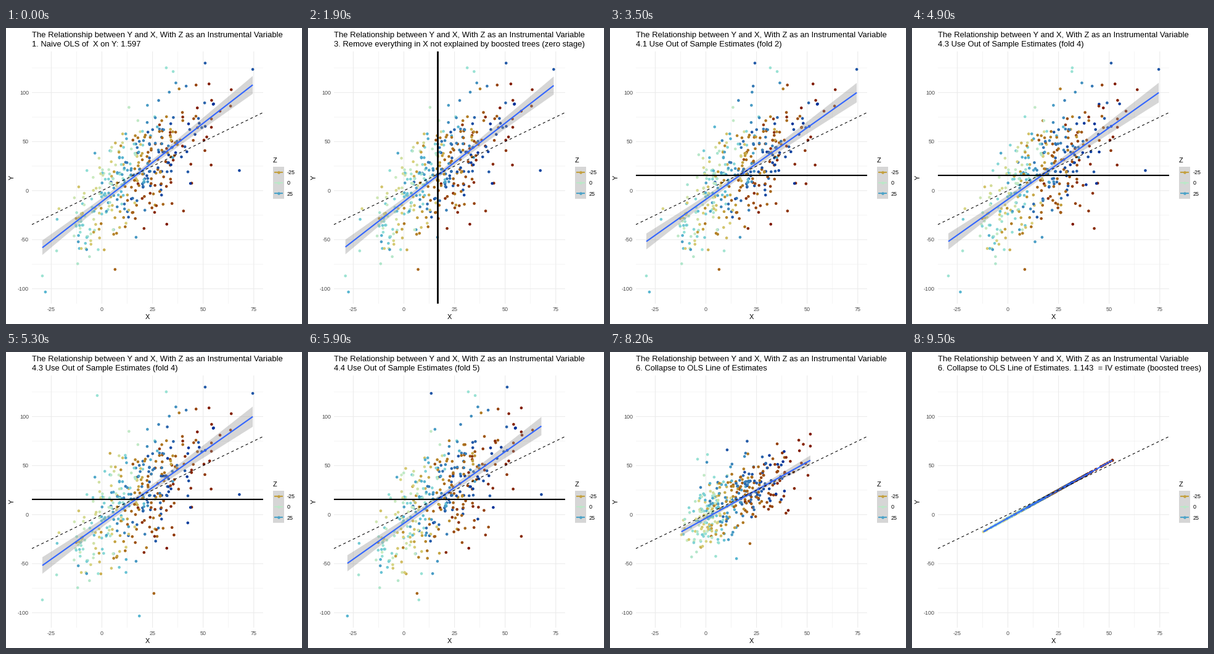
A matplotlib script for the animation above (10 s loop, 480 by 480 pixels).

```python
import numpy as np
import matplotlib.pyplot as plt
from matplotlib.animation import FuncAnimation
from matplotlib.colors import LinearSegmentedColormap, Normalize
from matplotlib.patches import Rectangle

SIZE, FRAMES, STEP = 480, 100, 100
plt.rcParams["font.family"] = "Liberation Sans"
BLUE, GRID, KEY = "#3366FF", "#EBEBEB", "#D6D6D6"
MEAN_X, MEAN_Y = 16.7, 15.5
OLS, IV = 1.597, 1.143

ROMA = LinearSegmentedColormap.from_list("roma", [
    "#7E1700", "#96440C", "#AB6E1B", "#C19B38", "#D9D27C", "#CBEBC2",
    "#95E1D6", "#5BBAD3", "#408EBE", "#2962AB", "#033198"])
Z_NORM = Normalize(-60, 53)

# The extremes of the cloud: x, y, z, prediction, fold
EXTREMES = [(-27.9, -103.3, 20, 18.5, 4), (-29.4, -86.9, 6, 7.4, 5),
            (74.5, 123.6, 44, 13.5, 5), (51, 130, 43, 24.2, 2),
            (31.8, 125.2, 7, 3, 1), (35.2, 121.4, 7, -2.3, 4),
            (67.9, 20.5, 48, 36, 2), (6.5, -80.3, -40, 25.7, 4)]


def signal(z):
    """Part of x that the instrument drives."""
    return 1 + 0.0147 * z**2


def make_data(n=390, seed=7):
    """A shared shock confounds x and y; predictions of x are noisy."""
    rng = np.random.default_rng(seed)
    m = 4 * n
    z = rng.uniform(-60, 53, m)
    shock, noise = rng.normal(0, 11, m), rng.normal(0, 25, m)
    x = signal(z) + shock
    y = x + 1.5 * shock + noise
    slope, base = np.polyfit(x, y, 1)
    y += (OLS - slope) * x + MEAN_Y - OLS * MEAN_X - base
    pred = np.clip(signal(z) + rng.normal(0, 6, m), -14, 58)
    fold = rng.integers(1, 6, m)
    keep = ((x > -24) & (x < 65) & (y > -76) & (y < 113)
            & (abs(y - MEAN_Y - OLS * (x - MEAN_X)) < 75))
    cloud = np.column_stack([x, y, z, pred, fold])[keep][:n]
    return np.vstack([cloud, EXTREMES]).T


X, Y, Z, PRED, FOLD = make_data()
FITTED = X - 5.5 * np.tanh((X - signal(Z)) / 8)
LINEAR = np.interp(PRED, [PRED.min(), PRED.max()], [-12.1, 51.6])


def on_line(x, slope):
    return MEAN_Y + slope * (x - MEAN_X)


class State:
    """Points, their fit line and its 95 % band, shown from a start time on."""

    def __init__(self, start, steps, title, x, y, slope, mean=""):
        self.start, self.steps, self.title = start, steps, title
        self.points, self.mean = np.array([x, y]), mean
        u = np.linspace(x.min(), x.max(), 80)
        error = np.std(y - on_line(x, slope)) / np.sqrt(len(x))
        half = 1.97 * error * np.hypot(1, (u - MEAN_X) / x.std())
        self.fit = np.array([u, on_line(u, slope), half])


def fold_state(k, start, steps):
    tag = "4." if k == 1 else f"4.{k - 1}"
    return State(start, steps, f"{tag} Use Out of Sample Estimates (fold {k})",
                 np.where(FOLD == k, PRED, X), Y, 1.46, "y")


TREES = "explained by boosted trees (zero stage)"
COLLAPSE = "6. Collapse to OLS Line of Estimates"
FLAT = on_line(LINEAR, IV)
STATES = [
    State(0, 1, f"1. Naive OLS of  X on Y: {OLS}", X, Y, OLS),
    State(1000, 2, f"2. Figure out what differences in X {TREES}",
          X, Y, OLS, "x"),
    State(1900, 5, f"3. Remove everything in X not {TREES}",
          FITTED, Y, 1.63, "x"),
    fold_state(1, 2800, 2),
    fold_state(2, 3400, 2),
    fold_state(3, 4000, 2),
    fold_state(4, 4900, 5),
    fold_state(5, 5800, 2),
    State(7000, 2, "5. Linearize", LINEAR, Y, IV, "x"),
    State(8200, 2, COLLAPSE, LINEAR, FLAT, IV, "y"),
    State(9100, 1, f"{COLLAPSE}. {IV}  = IV estimate (boosted trees)",
          LINEAR, FLAT, IV),
]

fig = plt.figure(figsize=(SIZE / 72, SIZE / 72), dpi=72, facecolor="white")
ax = fig.add_axes([41.9 / SIZE, 33.3 / SIZE, 375.3 / SIZE, 408.4 / SIZE])
ax.set(xlim=(-34.6, 79.7), ylim=(-115, 141.7))
ax.axis("off")


def label(x, y, text, size, ha="left", color="black", **kw):
    kw.setdefault("va", "baseline")
    return fig.text(x / SIZE, 1 - y / SIZE, text, size=size, ha=ha,
                    color=color, **kw)


def grid(rule, values, lw):
    for v in values:
        rule(v, color=GRID, lw=lw, zorder=0, snap=False)


def draw_guides():
    x_ticks, y_ticks = np.arange(-25, 76, 25), np.arange(-100, 101, 50)
    grid(ax.axvline, x_ticks[:-1] + 12.5, 0.53)
    grid(ax.axhline, y_ticks + 25, 0.53)
    grid(ax.axvline, x_ticks, 1.07)
    grid(ax.axhline, y_ticks, 1.07)
    for v in x_ticks:
        label(155.5 + 3.284 * v, 459, str(v), 9, "center", "#4D4D4D")
    for v in y_ticks:
        label(37, 266.8 - 1.591 * v, str(v), 9, "right", "#4D4D4D")
    label(229.5, 471.5, "X", 11, "center")
    label(9.5, 242, "Y", 11, "center", va="center", rotation=90)
    ax.plot([-34.6, 79.7], [-34.6, 79.7], color="black", lw=1.07,
            ls=(0, (4, 4)), dash_capstyle="butt", zorder=5)


def draw_legend():
    over = fig.add_axes([0, 0, 1, 1])
    over.set(xlim=(0, SIZE), ylim=(SIZE, 0))
    over.axis("off")
    over.add_patch(Rectangle((433, 225), 17.5, 51.9, fc=KEY, lw=0))
    label(433, 217.5, "Z", 11)
    for i, z in enumerate((-25, 0, 25)):
        y, color = 233.7 + 17.3 * i, ROMA(Z_NORM(z))
        over.plot([434.8, 448.8], [y, y], color=color, lw=2.13,
                  solid_capstyle="butt")
        over.scatter([441.8], [y], s=21, color=color, lw=0)
        label(456, y + 3.2, str(z), 9)


draw_guides()
draw_legend()
label(42, 15, "The Relationship between Y and X, "
      "With Z as an Instrumental Variable", 13.05)
title = label(42, 30, "", 13.05)
dots = ax.scatter(X, Y, s=21, c=ROMA(Z_NORM(Z)), lw=0, zorder=2)
band = ax.fill([0], [0], color="#999999", alpha=0.4, lw=0, zorder=3)[0]
line, = ax.plot([], [], color=BLUE, lw=2.13, solid_capstyle="butt", zorder=4)
mean_lines = {"x": ax.axvline(MEAN_X, color="black", lw=2.8, zorder=6),
              "y": ax.axhline(MEAN_Y, color="black", lw=2.13, zorder=6)}


def update(frame):
    now = frame * STEP
    i = max(k for k, s in enumerate(STATES) if s.start <= now)
    cur, prev = STATES[i], STATES[max(i - 1, 0)]
    t = min(1, ((now - cur.start) // STEP + 1) / cur.steps)
    e = (1 - np.cos(np.pi * t)) / 2

    dots.set_offsets((prev.points + (cur.points - prev.points) * e).T)
    x, y, w = prev.fit + (cur.fit - prev.fit) * e
    line.set_data(x, y)
    band.set_xy(np.column_stack([np.r_[x, x[::-1]],
                                 np.r_[y + w, (y - w)[::-1]]]))
    title.set_text(cur.title)
    for axis, mark in mean_lines.items():
        mark.set_visible(cur.mean == axis and (t == 1 or prev.mean == axis))
    return dots, line, band, title, *mean_lines.values()


anim = FuncAnimation(fig, update, frames=FRAMES, interval=STEP,
                     repeat=True, repeat_delay=0, blit=False)
plt.show()
```
